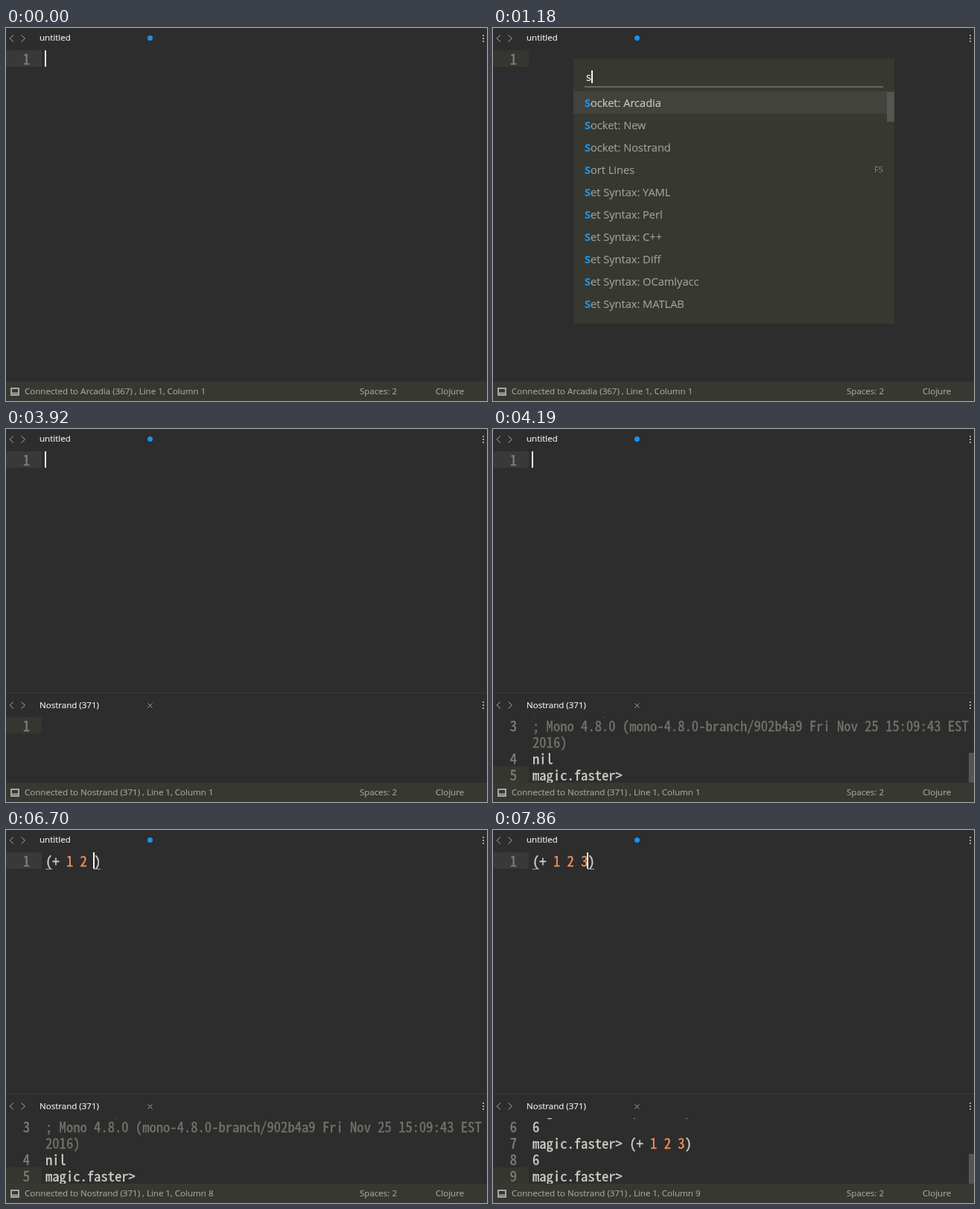
Animation of 646x501 px, one loop 8 s. Source, as an HTML page:

```html
<!DOCTYPE html>
<html lang="en">
<head>
<meta charset="utf-8">
<title>Editor session</title>
<style>
html, body { margin: 0; width: 100%; height: 100%; overflow: hidden; background: #2d2d2d; }
body { position: relative; font: 11.55px/16px "Open Sans", "Noto Sans", sans-serif; -webkit-text-stroke: .15px; }
body *, svg { position: absolute; white-space: pre; }
b, i, u { position: static !important; font-style: normal; text-decoration: none; }
svg { left: 0; top: 0; fill: none; stroke: #a5a5a5; }
.tab { left: 45px; top: 5px; color: #f4f4f4; }
.pane { left: 0; width: 646px; overflow: hidden; }
.code { font: 18.6px/22px "Noto Sans Mono CJK JP", "Noto Sans Mono CJK SC", "Noto Sans Mono", monospace; color: #d3d0c8; -webkit-text-stroke: .35px; }
.row { left: 0; width: 646px; height: 22px; }
.num { left: 0; top: 0; width: 32px; padding-right: 16px; height: 22px; text-align: right; color: #80807a; }
.num.live { background: #35362f; }
.focus .num.live { background: #393939; }
.txt { left: 53px; top: 0; }
.txt i { color: #f99157; }
.txt u { color: #747369; }
.caret { width: 2px; background: #f8f8f2; }
.mark { top: 52px; width: 9px; height: 1px; background: #a09f99; }
.thumb { background: #555551; }
#palette { left: 108px; top: 41px; width: 431px; background: #373830; font-size: 14.6px; line-height: 30px; color: #a0a09a; }
#query { left: 17px; top: 9px; color: #fff; }
#palette .line { left: 15px; top: 37px; width: 401px; height: 2px; background: #666761; }
#palette .item { left: 0; width: 416px; height: 30px; padding-left: 15px; }
#palette .item.on { background: #42433c; color: #c8c8c2; }
#palette b { color: #1b93e6; }
#palette .key { right: 15px; top: 0; font-size: 11px; color: #82827c; }
#status { left: 0; top: 475px; width: 646px; height: 26px; background: #373832; color: #a5a59f; line-height: 26px; }
#status span { top: 0; }
</style>
</head>
<body>
<svg width="646" height="501">
  <defs>
    <g id="bar">
      <path d="M10 9.5 5 14l5 4.500M20.500 9.500l5 4.500-5 4.500"/>
      <path d="M641 9v2m0 2v2m0 2v2" stroke-width="2"/>
    </g>
  </defs>
  <use href="#bar"/>
  <circle cx="193.500" cy="13.500" r="3.500" fill="#1693f3" stroke="none"/>
  <g id="lower">
    <path d="M0 354.500h646" stroke="#383838"/>
    <use href="#bar" y="357"/>
    <path d="M190.500 368.500l6 6m0-6-6 6"/>
  </g>
</svg>
<div class="tab">untitled</div>
<div id="editor" class="pane code" style="top:30px;height:324px"></div>
<div id="marks"></div>
<div id="caret" class="caret" style="top:30px;height:22px"></div>
<div id="replTab" class="tab" style="top:363px">Nostrand (371)</div>
<div id="repl" class="pane code" style="top:387px;height:88px"></div>
<div id="replThumb" class="thumb" style="left:639px;width:7px;height:40px"></div>
<div id="palette"></div>
<div id="status">
  <svg width="24" height="26"><path d="M7 9h10v9H7zM7 15.500h10" stroke-width="2"/></svg>
  <span id="message" style="left:25px"></span>
  <span style="left:475px">Spaces: 2</span>
  <span style="left:577px">Clojure</span>
</div>
<script>
const LOOP = 8000, PITCH = 9.3, ROW = 22, THUMB = 40;
const $ = id => document.getElementById(id);

// Asterisks enclose the letters matched by the query.
const syntaxes = ["YAML", "Perl", "C++", "Diff", "OCamlyacc", "MATLAB"];
const sockets = (hit, rest) => ["Arcadia", "New", "Nostrand"].map(n => `*${hit}*${rest}: ${n}`);
const lists = {
  "": ["Socket: Arcadia", "Socket: New", "Socket: Nostrand", "Sort Lines|F5",
    ...syntaxes.map(n => "Set Syntax: " + n)],
  s: [...sockets("S", "ocket"), "*S*ort Lines|F5", ...syntaxes.map(n => "*S*et Syntax: " + n)],
  so: [...sockets("So", "cket"), "*So*rt Lines|F5", "*So*rt Lines (Case Sensitive)",
    "*S*et Syntax: *O*Camlyacc", "*S*et Syntax: *O*Caml", "*S*et Syntax: *O*Camllex",
    "*S*et Syntax: Pyth*o*n", "*S*et Syntax: Cl*o*jure"],
  soc: [...sockets("Soc", "ket"), "Package Control: Di*s*c*o*ver Pa*c*kages",
    "Preference*s*: Br*o*wse Pa*c*kages", "*S*et Syntax: *OC*amlyacc", "*S*et Syntax: *OC*aml",
    "*S*et Syntax: *OC*amllex", "*So*rt Lines (*C*ase Sensitive)", "*S*et Syntax: Cl*o*jure (*C*)"],
  sock: [...sockets("Sock", "et"), "Package Control: Di*s*c*o*ver Pa*ck*ages",
    "Preference*s*: Br*o*wse Pa*ck*ages"],
};

const prompt = "magic.faster> ", call = "(+ 1 2 3)";
const banner = [
  [1, "; Nostrand 0.1 (master/4f1c2d8 Fri Dec 16 11:20:31 EST"], ["", "; 2016)"],
  [2, "; Clojure 1.7.0 (master-SNAPSHOT/7be2a90 Fri Dec 16 11:20:31"], ["", "; EST 2016)"],
  [3, "; Mono 4.8.0 (mono-4.8.0-branch/902b4a9 Fri Nov 25 15:09:43 EST"], ["", "2016)"],
  [4, "nil"],
];
function replRows(evals) {
  if (evals < 0) return [[1, ""]];
  const rows = [...banner];
  for (let k = 0; k < evals; k++) rows.push([5 + 2 * k, prompt + call], [6 + 2 * k, "6"]);
  return [...rows, [5 + 2 * evals, prompt]];
}

// Each entry changes the state from its time on; "left" is the scroll distance still to go.
const steps = [
  [0, { code: "", query: null, pick: 0, listThumb: 0, repl: false, evals: -1, left: 0, replThumb: false }],
  [500, { query: "", listThumb: 104 }],
  [1000, { listThumb: 0 }],
  [1180, { query: "s", listThumb: 40 }],
  [1530, { query: "so", listThumb: 64 }],
  [1890, { query: "soc", listThumb: 0 }],
  [2010, { query: "sock", pick: 2 }],
  [3920, { query: null, repl: true }],
  [4040, { evals: 0, left: 66, replThumb: true }],
  [4100, { left: 22 }],
  [4190, { left: 0 }],
  [4540, { replThumb: false }],
  ...[4930, 5770, 6010, 6220, 6460, 6580, 6700, 6820].map((t, k) => [t, { code: call.slice(0, k + 1) }]),
  [7330, { evals: 1, left: 44, replThumb: true }],
  [7390, { left: 26 }],
  [7450, { left: 8 }],
  [7510, { left: 0 }],
  [7750, { evals: 2, left: 36 }],
  [7810, { left: 14 }],
  [7860, { left: 0 }],
];
let state = {};
const states = steps.map(([, change]) => state = { ...state, ...change });

const escape = s => s.replace(/>/g, "&gt;");
const paint = s => s[0] === ";" || s === "2016)" ? `<u>${s}</u>`
  : /^(magic|\()/.test(s) ? escape(s).replace(/\d/g, "<i>$&</i>") : s;
const rowHtml = ([num, text], y, live) => `<div class="row" style="top:${y}px">` +
  `<div class="num${live ? " live" : ""}">${num}</div><div class="txt">${paint(text)}</div></div>`;

function paletteHtml({ query, pick, listThumb }) {
  const items = lists[query].map((item, k) => {
    const [label, key = ""] = item.split("|");
    return `<div class="item${k === pick ? " on" : ""}" style="top:${44 + 30 * k}px">` +
      label.replace(/\*(.+?)\*/g, "<b>$1</b>") + `<span class="key">${key}</span></div>`;
  });
  return `<div class="line"></div>${items.join("")}
    <div id="query">${query}<i class="caret" style="display:inline-block;height:17px;vertical-align:-3px"></i></div>
    <div class="thumb" style="left:421px;top:45px;width:10px;height:${listThumb}px"></div>`;
}

function draw(s) {
  const open = s.query !== null, typed = s.code.length;
  $("editor").classList.toggle("focus", !open);
  $("editor").innerHTML = rowHtml([1, s.code && s.code + ")"], 0, true);
  $("caret").hidden = open;
  $("caret").style.left = 52 + Math.floor(typed * PITCH) + "px";
  $("marks").innerHTML = typed
    ? [0, typed].map(k => `<div class="mark" style="left:${53 + k * PITCH}px"></div>`).join("") : "";

  $("palette").hidden = !open;
  if (open) {
    $("palette").innerHTML = paletteHtml(s);
    $("palette").style.height = 55.5 + 30 * lists[s.query].length + "px";
  }

  $("lower").style.display = s.repl ? "" : "none";
  $("repl").hidden = $("replTab").hidden = !s.repl;
  const rows = replRows(s.evals), room = Math.max(0, rows.length * ROW - 88);
  $("repl").innerHTML = rows.map((r, k) =>
    rowHtml(r, k * ROW - room + s.left, k === rows.length - 1)).join("");
  $("replThumb").hidden = !s.replThumb;
  $("replThumb").style.top = 387 + (88 - THUMB) * (room ? 1 - s.left / room : 0) + "px";

  $("message").textContent =
    `Connected to ${s.repl ? "Nostrand (371)" : "Arcadia (367)"} , Line 1, Column ${typed + 1}`;
}

let shown = -1;
function tick() {
  const t = performance.now() % LOOP;
  const now = steps.findLastIndex(([start]) => start <= t);
  if (now !== shown) draw(states[shown = now]);
  requestAnimationFrame(tick);
}
tick();
</script>
</body>
</html>
```
